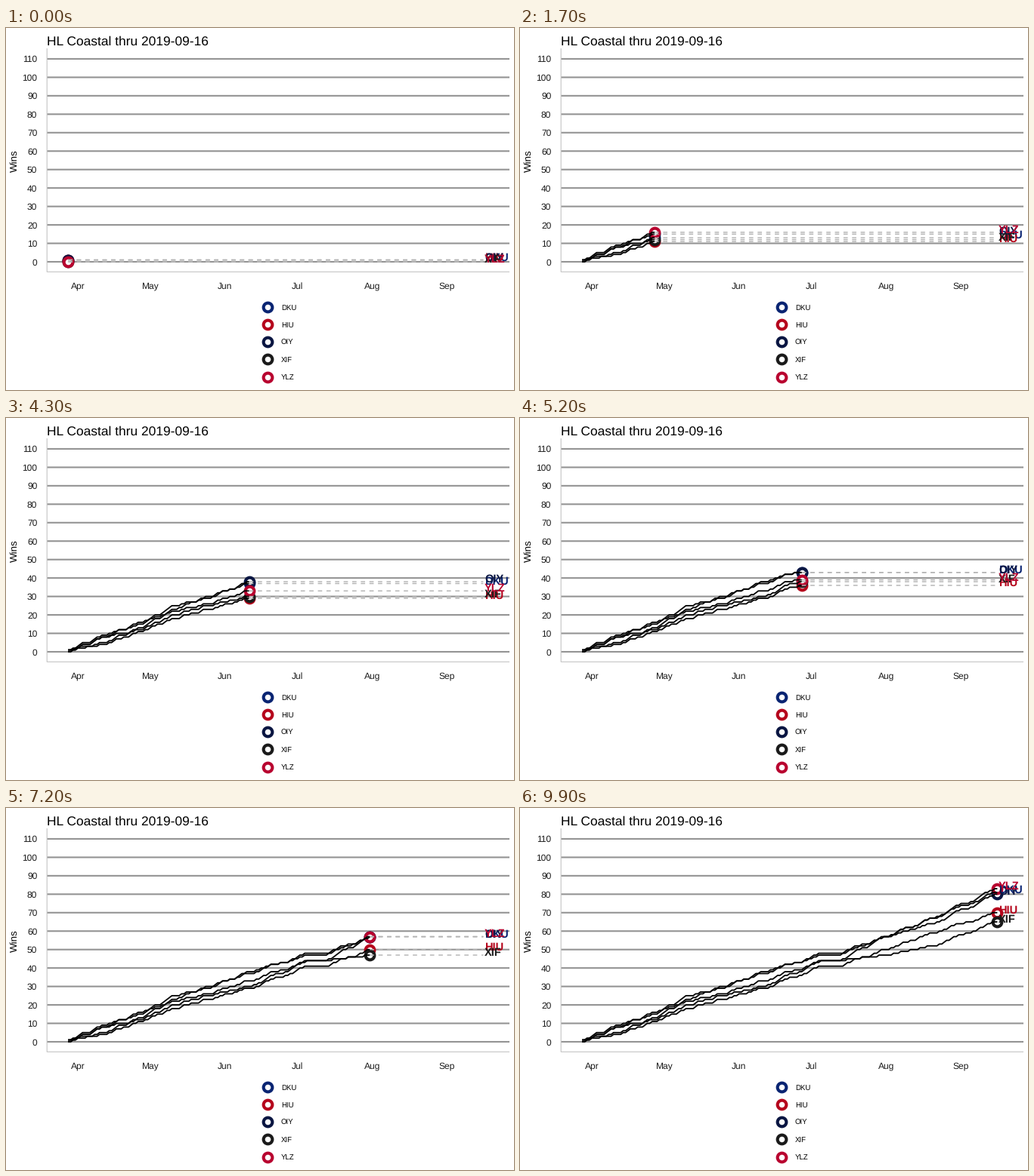
Animation, 672 px wide and 480 px high, one loop 10000 ms. Source, as a matplotlib script:

```python
import numpy as np
import matplotlib.pyplot as plt
from matplotlib.animation import FuncAnimation

W, H, FRAMES = 672, 480, 100
LAST = 172               # days from 28 March to 16 September
BREAK = (100, 106)       # no games between these days
PX = 0.75                # points per pixel at 96 dpi
LEFT, RIGHT, TOP, BOTTOM = 54.2, 666, 27, 323.3

plt.rcParams["font.family"] = "Liberation Sans"
plt.rcParams["text.hinting"] = "none"

# Team colours and win totals on a few key days
KEY_DAYS = [0, 15, 30, 44, 58, 75, 106, 126, 145, 172]
TEAMS = {
    "DKU": ("#0a2472", [1, 5, 13, 23, 30, 37, 48, 57, 67, 81]),
    "HIU": ("#b5061c", [1, 4, 11, 18, 23, 29, 41, 50, 59, 70]),
    "OIY": ("#0a1642", [1, 9, 15, 25, 29, 38, 47, 57, 64, 80]),
    "XIF": ("#1a1a1a", [0, 8, 12, 20, 25, 30, 44, 47, 52, 65]),
    "YLZ": ("#b8042f", [0, 8, 16, 22, 26, 33, 44, 57, 67, 83]),
}
MONTHS = {"Apr": 4, "May": 34, "Jun": 65, "Jul": 95, "Aug": 126, "Sep": 157}


def day_x(day):
    return 82.2 + 3.193 * day


def win_y(wins):
    return 310 - 2.446 * wins


def played(day):
    """Days of play so far, leaving out the mid-season break."""
    return np.minimum(day, BREAK[0]) + np.maximum(day - BREAK[1], 0)


def season(totals):
    """Whole wins per day; a small wave between key days makes streaks."""
    knots = np.arange(len(totals))
    pos = np.interp(played(days), played(np.array(KEY_DAYS)), knots)
    pos -= 0.05 * np.sin(4 * np.pi * pos)
    return np.floor(np.interp(pos, knots, totals) + 0.5)


days = np.arange(LAST + 1)
xs = day_x(days)

fig = plt.figure(figsize=(7, 5), dpi=96, facecolor="white")
ax = fig.add_axes([0, 0, 1, 1])
ax.set_xlim(0, W)
ax.set_ylim(H, 0)
ax.axis("off")


def text(x, y, s, size, **kw):
    return ax.text(x, y, s, fontsize=size * PX,
                   **{"va": "baseline", "color": "black", **kw})


def line(x, y, color, width, **kw):
    return ax.plot(x, y, color=color, lw=width * PX, snap=False,
                   solid_capstyle="butt", **kw)[0]


def ring(x, y, color):
    return ax.plot([x], [y], "o", ms=11.7 * PX, mew=4.1 * PX, mfc="white",
                   mec=color, zorder=2, snap=False)[0]


# Fixed parts
for wins in range(0, 111, 10):
    y = win_y(wins)
    line([LEFT, RIGHT], [y, y], "#949494", 2.1, zorder=1)
    text(41.3, y + 4.4, str(wins), 12, ha="right", color="#1a1a1a")
for name, day in MONTHS.items():
    text(day_x(day), 345.8, name, 12, ha="center", color="#1a1a1a")
line([LEFT, LEFT, RIGHT], [TOP, BOTTOM, BOTTOM], "#bebebe", 1, zorder=1.5)
text(53.8, 23, "HL Coastal thru 2019-09-16", 17.33)
text(11.6, 176, "Wins", 13.33, rotation=90, ha="center", va="center")

# Moving parts, with their legend entries
parts = []
for i, (name, (color, totals)) in enumerate(TEAMS.items()):
    row = 370.3 + 23.05 * i
    ring(346.4, row, color)
    text(364, row + 3.6, name, 9.6)
    parts.append((
        win_y(season(totals)),
        ring(0, 0, color),
        line([], [], "black", 1.8, zorder=3, solid_joinstyle="round"),
        line([], [], "#b3b3b3", 1.42, zorder=4, linestyle=(0, (4, 4)),
             dash_capstyle="butt"),
        text(633, 0, name, 14.67, weight="bold", color=color, zorder=5),
    ))


def draw(frame):
    day = int((frame + 0.5) * LAST / (FRAMES - 1))
    for ys, dot, path, guide, label in parts:
        x, y = xs[day], ys[day]
        dot.set_data([x], [y])
        path.set_data(xs[:day + 1], ys[:day + 1])
        guide.set_data([x, xs[-1]], [y, y])
        label.set_y(y + 0.9)
    return []


anim = FuncAnimation(fig, draw, frames=FRAMES, interval=100,
                     init_func=lambda: draw(0), repeat=True, repeat_delay=0)
plt.show()
```
